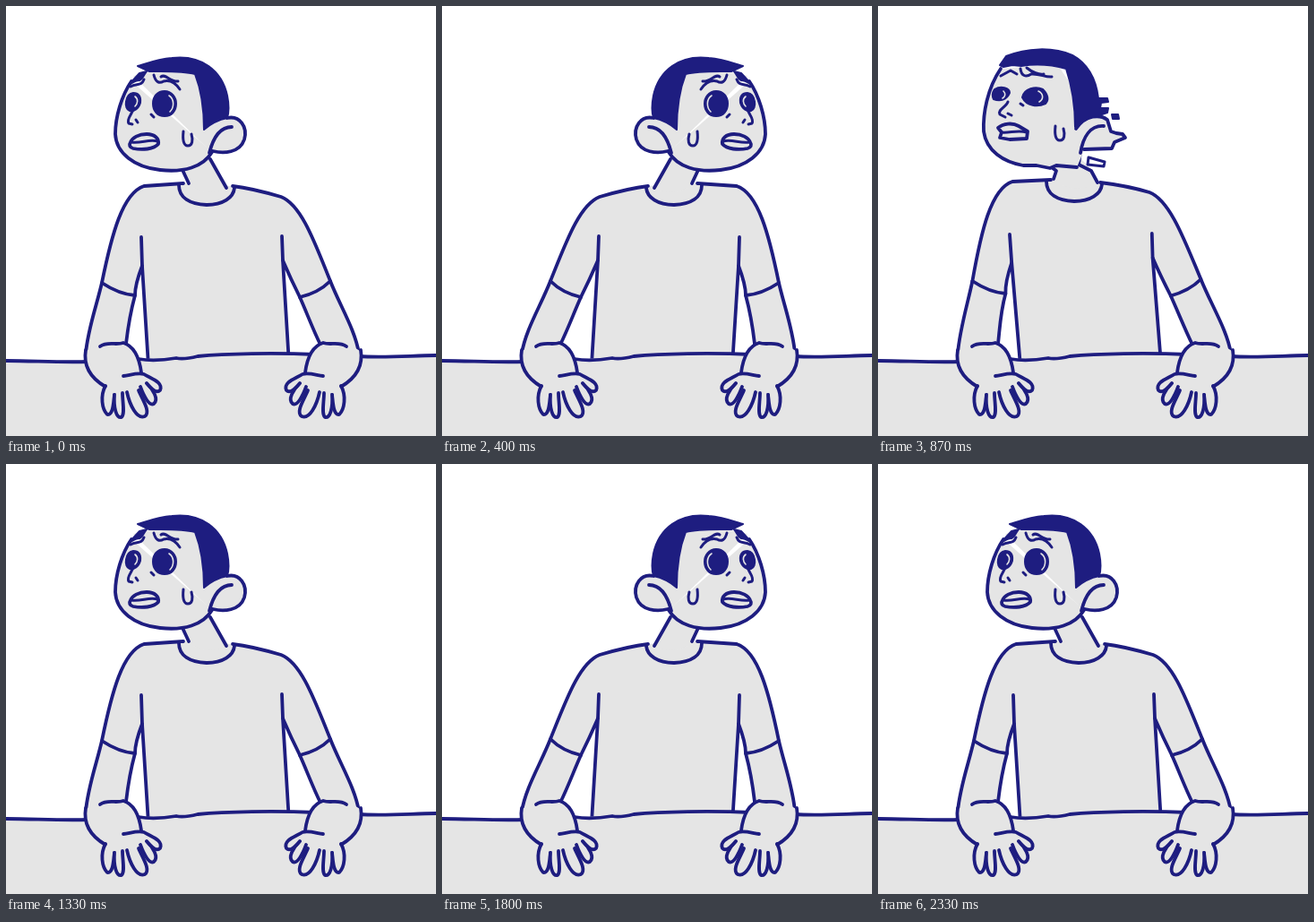
Recreate the animation shown at these times as an HTML page. Size 480 by 480 pixels, loop 2.67 s.

```html
<!DOCTYPE html>
<html lang="en">
<head>
<meta charset="utf-8">
<title>Looking around</title>
<style>
  html, body { margin: 0; width: 100%; height: 100%; overflow: hidden; background: #fff; }
  svg { display: block; width: 100%; height: 100%; }
  path { fill: #e5e5e5; stroke: #1e1d80; stroke-width: 3.8; stroke-linecap: round; stroke-linejoin: round; }
  .line { fill: none; }
  .thin { fill: none; stroke-width: 3; }
  .ink { fill: #1e1d80; stroke-width: 2; }
  .glint { fill: none; stroke: #e5e5e5; stroke-width: 1.6; }
  .flat { stroke: none; }
</style>
</head>
<body>
<svg viewBox="0 0 480 480">
  <g id="figure"></g>
  <path class="flat" d="M0 396L90 397L150 394L190 393L230 389L315 388L395 391L480 390V480H0Z"/>
  <path class="line" d="M-3 396C30 396 60 398 92 397M148 394C160 396 178 395 190 393C198 395 206 393 214 391C245 388 300 387 346 389M393 391C425 393 455 390 483 390"/>
  <g id="hand">
    <path class="flat" d="M89 386C96 378 125 376 134 377C147 383 148 398 153 407L172 424L165 442L155 458L128 458L113 455L109 425C98 417 88 403 89 386Z"/>
    <path class="line" d="M89 384C86 402 94 415 111 425M105 380C113 374 123 379 131 376C144 380 149 394 151 409"/>
    <path d="M111 424C105 435 107 450 113 456C119 457 120 445 121 434"/>
    <path d="M121 434C120 448 123 461 129 459C133 455 130 442 130 432"/>
    <path d="M135 431C138 445 146 462 155 458C162 453 152 439 148 429"/>
    <path d="M150 425C154 436 160 447 165 444C171 439 164 428 157 421"/>
    <path d="M157 421C162 427 168 433 172 429C176 420 162 416 154 411C147 409 139 412 131 413"/>
  </g>
  <use href="#hand" transform="translate(485 0) scale(-1 1)"/>
</svg>
<script>
const path = (d, kind = "") => `<path class="${kind}" d="${d}"/>`;
const group = (x, y, content) => `<g transform="translate(${x} ${y})">${content}</g>`;

const collar = path("M193 200C193 214 205 221 224 222C242 222 254 214 255 203");

// Torso and arms: the shoulders lean by dx, dl (left height) and dr (right height),
// the collar moves by cx, cy and the side seams start "seam" higher.
function body(dx, dl, dr, cx, cy, seam) {
  const left = (x, y, w = 1) => `${x + dx * w} ${y + dl * w} `;
  const right = (x, y, w = 1) => `${x + dx * w} ${y + dr * w} `;
  const neck = (x, y) => `${x + cx} ${y + cy} `;
  const foot = dx > 0 ? 0.3 : 0;
  return path(`M${neck(198, 198)}L${left(154, 201)}C${left(130, 209)}${left(118, 255, .7)}${left(107, 309, .4)}
    C${left(101, 335, .3)}91 362 89 388L100 402L138 402L134 377
    C136 360 ${left(138, 345, .4)}${left(144, 323, .4)}C${left(144, 314, .5)}${left(147, 303, .6)}${left(152, 290, .7)}
    L${left(159, 402, foot)}L${right(316, 400, foot)}L${right(309, 284, .6)}
    C${right(315, 298, .6)}${right(322, 313, .4)}${right(328, 325, .3)}C${right(336, 343, .2)}343 362 351 378
    L350 400L390 400L394 388C390 362 ${right(373, 335, .3)}${right(362, 307, .4)}
    C${right(345, 265, .7)}${right(330, 222)}${right(307, 213)}C${right(290, 208)}${neck(270, 203)}${neck(253, 201)}`)
    + path(`M${left(107, 309, .4)}C${left(119, 317, .4)}${left(131, 322, .4)}${left(144, 323, .4)}
    M${right(362, 307, .4)}C${right(352, 317, .4)}${right(341, 322, .4)}${right(328, 325, .3)}
    M${151 + dx} ${258 - seam}L${left(152, 290, .7)}M${308 + dx * .55} ${257 - seam}L${right(309, 284, .6)}`, "line")
    + group(cx, cy, collar);
}

const sweat = path("M198 140C197 149 198 156 203 156C208 156 209 150 207 143", "thin");

const calm = body(0, 0, 0, 0, 0, 0)
  + path("M197 180L205 199C215 210 235 210 247 203L227 168", "flat")
  + path("M197 183L204 198M228 171L246 203", "line")
  + path("M142 78L230 164L236 110L205 65Z", "flat")
  + path("M140 84C129 100 122 124 122 143C123 164 143 180 172 183C198 186 220 180 230 163")
  + path("M222 139C230 130 238 126 247 125C261 122 270 135 266 149C261 164 243 165 231 162L226 160Z", "flat")
  + path("M247 125C261 122 270 135 266 149C261 164 243 165 231 162M252 135C238 135 231 148 227 164", "line")
  + path("M147 67C160 63 171 59 185 58C218 54 241 72 247 100C249 110 249 118 247 125C237 127 229 131 221 138C221 115 218 94 211 76C196 72 174 73 160 73Z", "ink")
  + path("M137 88L149 75L157 73C153 77 154 81 149 83C144 83 141 86 137 88Z", "ink")
  + path("M165 77C167 85 171 87 176 84C184 82 190 87 194 93M173 79C178 75 183 85 192 84M139 90C146 86 151 90 154 82", "thin")
  + path("M177 95C185 95 190 102 190 109C190 117 185 123 177 123C169 123 164 117 164 109C164 101 169 95 177 95Z", "ink")
  + path("M142 97C148 97 151 101 150 108C148 115 143 118 138 117C131 115 133 98 142 97Z", "ink")
  + path("M182 100C188 104 188 113 183 118M144 101C148 104 147 109 144 112", "glint")
  + path("M142 115C141 121 134 126 137 131L141 132M145 127L147 130M162 121L165 124", "thin")
  + path("M139 152C141 147 148 143 157 143C166 143 171 148 170 154C165 160 152 161 142 159C138 158 137 155 139 152Z")
  + path("M140 152C150 154 160 148 169 151", "thin") + sweat;

const over = body(-4, -5, -5, -5, -4, 3)
  + path("M199 176L196 193C210 207 232 206 245 197L240 184L224 168Z", "flat")
  + path("M195 181L199 184L196 193M226 163L224 177L238 184L245 197", "line")
  + path("M137 70C122 92 117 120 118 140C121 162 140 174 162 178L177 178L192 181L199 178L222 180L230 161L224 100L200 65Z", "flat")
  + path("M137 70C122 92 117 120 118 140C121 162 140 174 162 178L177 178L192 181L199 178L222 180", "line")
  + path("M221 134C235 120 248 122 257 127L260 141L275 143L275 149L262 152L263 160L230 161Z", "flat")
  + path("M221 137C232 121 248 121 256 127L260 140L266 142L273 143L276 147L264 152L261 159L230 160M252 134C237 133 229 146 226 164", "line")
  + path("M136 66L143 56C165 47 195 45 217 55C237 66 244 87 246 103L256 103L257 107L249 108L248 114L257 114L256 119L247 122C236 124 229 127 220 135C220 110 216 88 210 70C192 65 173 65 160 67L150 66L140 68Z", "ink")
  + path("M261 121H268L269 126H262Z", "ink")
  + path("M235 169L253 174L252 179L234 177Z", "thin")
  + path("M137 78L148 72L155 76M159 70C160 78 165 80 171 76C180 75 187 80 194 79M166 69C172 74 180 77 185 76", "thin")
  + path("M161 102C163 92 176 89 184 93C190 99 191 105 187 109C178 113 166 112 161 102Z", "ink")
  + path("M130 93C137 89 147 91 147 97C144 105 136 107 129 104C127 100 128 96 130 93Z", "ink")
  + path("M179 95C185 98 185 104 180 107M140 95C143 98 142 101 139 103", "glint")
  + path("M145 107C143 113 133 116 136 121L142 124M145 120L149 122M159 109L162 111", "thin")
  + path("M134 136C140 131 150 130 157 134L167 140L166 148L147 149L136 147L138 141Z")
  + path("M138 141C147 142 156 138 166 141", "thin") + group(0, -6, sweat);

const middleFace = path("M229 190L218 207C232 235 268 233 277 206L270 196Z", "flat")
  + path("M231 192C231 200 224 204 217 207M268 204L276 205", "line")
  + path("M321 124C330 120 328 146 322 152")
  + path("M217 112L214 130L217 160C217 175 213 186 221 190C234 196 250 198 265 198L277 199C306 199 324 186 323 153L319 117L314 100L268 80Z", "flat")
  + path("M215 128L217 160C217 175 213 186 221 190C234 196 250 198 265 198M268 203L284 199C308 197 324 183 323 153L319 117L315 100", "line")
  + path("M213 118C217 92 241 69 267 69C289 70 307 81 317 99L309 95L305 106L297 104L292 122L283 105L274 114L268 104L262 120L247 106L238 114L229 112L218 127Z", "ink")
  + path("M271 124L281 116L291 117L281 126Z", "ink")
  + path("M247 130C258 137 271 138 284 134M252 141C261 140 270 143 277 150M254 148C261 148 266 146 272 145M291 127L289 135M295 133L307 126L312 120M300 142L308 140L314 132M310 128L319 137", "thin")
  + path("M296 140C300 150 309 156 306 164L301 167M292 164L297 166", "thin")
  + path("M268 187C272 178 286 172 299 175L304 179L307 181L305 187C294 190 281 194 272 194C268 193 267 190 268 187Z")
  + path("M272 187C280 181 292 184 303 180", "thin")
  + path("M232 149C230 160 238 162 239 151", "thin");

const trail = path("M181 118C188 116 196 116 202 118L204 122L199 125L183 122Z", "ink")
  + path("M209 110L219 107L220 116L211 118Z", "ink")
  + path("M234 125C237 120 247 121 248 126C245 131 237 130 234 125Z", "ink")
  + path("M215 126C205 133 197 131 189 136C190 144 202 142 202 149C204 158 206 161 216 162Z", "flat")
  + path("M215 128C205 133 197 131 189 136C190 143 198 143 202 147C203 156 206 161 216 162", "line")
  + path("M184 173L206 177L207 184L185 181Z", "thin");

const middle = body(17, 9, -4, 22, 5, 4) + middleFace;
const smear = middle + trail;

// One turn to the right; a turn to the left is its mirror image.
const turn = [[middle, true], [smear, false], [over, true], [calm, true]];
const turnStarts = [3, 11, 21, 32];
const LOOP = 2670, STEP = 200 / 3;
const figure = document.getElementById("figure");
const origin = performance.now();
let shown;

function draw(now) {
  const step = Math.floor((now % LOOP + 4) / STEP) % 40;
  const started = turnStarts.filter(start => start <= step).length;
  const index = started ? Math.min(step - turnStarts[started - 1], 3) : 3;
  const toRight = started % 2 === 1;
  const [pose, flipped] = turn[index];
  const key = index + "/" + toRight;
  if (key !== shown) {
    shown = key;
    figure.innerHTML = pose;
    figure.setAttribute("transform", flipped === toRight ? "translate(483 0) scale(-1 1)" : "");
  }
  requestAnimationFrame(() => draw(performance.now() - origin));
}
draw(0);
</script>
</body>
</html>
```
